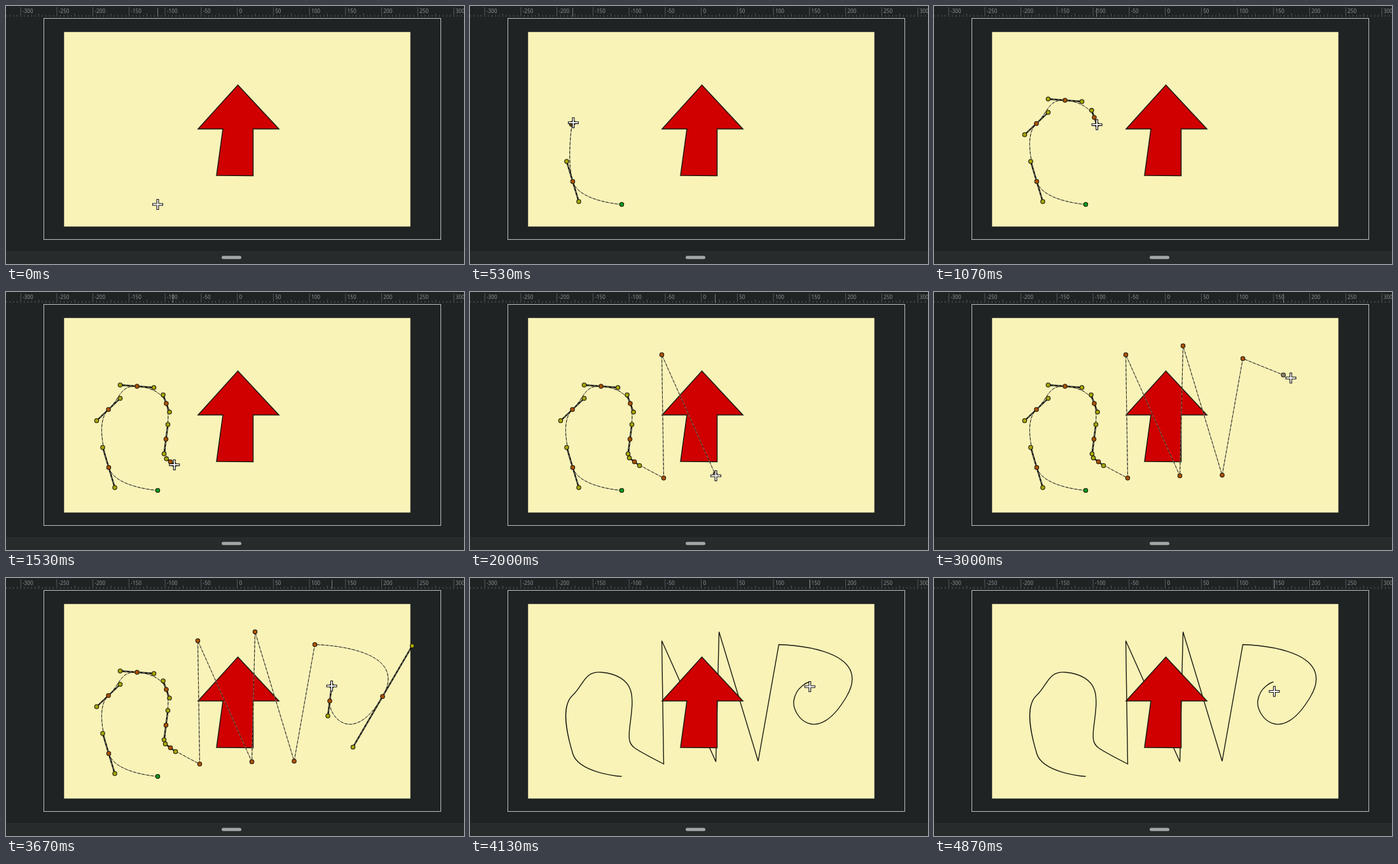
Write an HTML page that moves like this. It is 720 px wide and 405 px high and loops after 4.99 s.

```html
<!DOCTYPE html>
<html lang="en">
<head>
<meta charset="utf-8">
<title>Drawing a spline</title>
<style>
  html, body { margin: 0; width: 100%; height: 100%; overflow: hidden; background: #1f2324; }
  svg { display: block; width: 720px; height: 405px; }
  text { font: 8.2px "Noto Sans", sans-serif; fill: #8d9192; }
  path { fill: none; }
</style>
</head>
<body>
<svg viewBox="0 0 720 405">
  <rect width="720" height="405" fill="#1f2324"/>
  <g id="ruler"></g>
  <rect x="59.5" y="19.5" width="624" height="347" fill="none" stroke="#bcc0c0"/>
  <rect x="91.3" y="40.8" width="544.4" height="305.4" fill="#faf3b8"/>
  <path id="outline" stroke="#1b1a12" stroke-width="1.4"/>
  <path d="M364.5 124L429 193H388.5V266.5L331 266L341 193H302Z" style="fill:#d00000" stroke="#1b1a12" stroke-width="1.5"/>
  <g id="guides"></g>
  <path id="tick" stroke="#777c7d"/>
  <g id="cursor" stroke-linecap="square">
    <path d="M-6.5 0H6.5M0 -6.5V6.5" stroke="#111" stroke-width="4"/>
    <path d="M-6.5 0H6.5M0 -6.5V6.5" stroke="#fff" stroke-width="1.8"/>
  </g>
  <rect y="383" width="720" height="22" fill="#272b2c"/>
  <rect y="383" width="720" height="1" fill="#1a1d1e"/>
  <rect x="339" y="392.3" width="31" height="5" rx="2.5" fill="#a3a6a6"/>
</svg>
<script>
const LOOP = 4990, STEP = 200 / 3, FINISH = 62, LAG = 0.25;
const $ = id => document.getElementById(id);
const ease = u => u * u * (3 - 2 * u);
const clamp = u => Math.min(1, Math.max(0, u));

// Value at k on a line of [k, ...values] keys.
function between(keys, k, curve = u => u) {
  const i = keys.findIndex(p => p[0] > k);
  if (i < 0) return keys[keys.length - 1].slice(1);
  const a = keys[Math.max(i - 1, 0)], b = keys[i];
  const u = curve(clamp((k - a[0]) / (b[0] - a[0])));
  return a.slice(1).map((v, j) => v + (b[j + 1] - v) * u);
}

// The drawn word: "x,y" is a corner, "x,y>hx,hy" a smooth node with its outgoing handle.
const word = `238.5,311.5 161.5,275.5>152,244 161,184.5>179.5,167 206,148>232.5,150
  252,175>257,188.5 251.5,231>248.5,254 258.5,266.5>266.5,272.5 304.5,292 301.5,98.5
  386.5,288.5 391.5,84.5 453,287.5 485.5,104.5 592,186>545.5,265.5 509,193>512,169.5 533.5,163`;

// Drawing pace: node index to step of its click.
const pace = [[0, 0.5], [6, 22], [9, 30.5], [12, 42], [13, 47], [15, 58]];

const nodes = word.split(/\s+/).map((item, i) => {
  const [[x, y], [hx, hy] = [x, y]] = item.split(">").map(p => p.split(",").map(Number));
  const [press] = between(pace, i), length = Math.hypot(hx - x, hy - y);
  return { x, y, hx, hy, press, release: press + (length && 1.1 + length / 30) };
});

// Cursor route: travel, settle on the node, pull its handle, wait.
const route = nodes.flatMap((n, i) => {
  const next = nodes[i + 1];
  const leave = next ? Math.max(n.release, next.press - 3) : n.release;
  return [[n.press - 0.6, n.x, n.y], [n.press, n.x, n.y], [n.release, n.hx, n.hy], [leave, n.hx, n.hy]];
});
route.push([45, 561, 135], [66, 535, 178]);
route.sort((a, b) => a[0] - b[0]);
const cursorAt = k => between(route, k, ease);

// Nodes clicked by step k, with handles mirrored about each node.
function placed(k) {
  return nodes.filter(n => n.press <= k).map(n => {
    const u = ease(clamp((k - n.press) / (n.release - n.press || 1)));
    return { ...n, dx: (n.hx - n.x) * u, dy: (n.hy - n.y) * u };
  });
}

function curve(list) {
  return list.map((n, i) => {
    if (!i) return `M${n.x} ${n.y}`;
    const p = list[i - 1];
    return `C${p.x + p.dx} ${p.y + p.dy} ${n.x - n.dx} ${n.y - n.dy} ${n.x} ${n.y}`;
  }).join("");
}

const dot = (x, y, fill) =>
  `<circle cx="${x}" cy="${y}" r="3.2" fill="${fill}" stroke="#1c1a0c" stroke-width="1.1"/>`;

const dashed = (d, under, width, over, overWidth) =>
  `<path d="${d}" stroke="${under}" stroke-width="${width}"/>` +
  `<path d="${d}" stroke="${over}" stroke-width="${overWidth}" stroke-dasharray="4 3"/>`;

function guides(k) {
  const list = placed(k), last = list[list.length - 1];
  if (!last) return "";
  const shown = [...list];
  if (k > last.release && list.length < nodes.length) {
    const [x, y] = cursorAt(k - LAG);
    shown.push({ x, y, dx: 0, dy: 0, preview: true });
  }
  const smooth = list.filter(n => n.dx || n.dy);
  const bars = smooth.map(({ x, y, dx, dy }) =>
    dashed(`M${x - dx} ${y - dy}L${x + dx} ${y + dy}`, "#0e0e0a", 2.4, "#85867c", 1));
  const ends = smooth.map(({ x, y, dx, dy }) =>
    dot(x - dx, y - dy, "#a8a600") + dot(x + dx, y + dy, "#a8a600"));
  const dots = shown.map((n, i) =>
    dot(n.x, n.y, n.preview ? "#8b8672" : i ? "#ae5200" : "#0b9a1c"));
  return dashed(curve(shown), "#858170", 1, "#25231a", 1) + [...bars, ...ends, ...dots].join("");
}

function buildRuler() {
  const unit = 56.74 / 50;
  let labels = "", ticks = "";
  for (let v = -320; v <= 315; v += 5) {
    const x = 363.6 + v * unit, major = v % 50 === 0;
    ticks += `M${x} ${major ? 2 : v % 25 ? 14 : 12}V17`;
    if (major) labels += `<text x="${x + 2.8}" y="11.3">${v}</text>`;
  }
  $("ruler").innerHTML = `<path d="${ticks}" stroke="#5b6061" stroke-width=".9"/>${labels}`;
}

function draw(k) {
  const done = k >= FINISH;
  const [x, y] = cursorAt(k), [tickX] = cursorAt(k - LAG);
  $("guides").innerHTML = done ? "" : guides(k);
  $("outline").setAttribute("d", done ? curve(placed(k)) : "");
  $("tick").setAttribute("d", `M${Math.floor(tickX) + 0.5} 3V17`);
  $("cursor").setAttribute("transform", `translate(${x} ${y})`);
}

let shownStep = -1;
const start = performance.now();
function play() {
  const t = (performance.now() - start) % LOOP;
  const k = Math.min(73, Math.floor((t + 4) / STEP));
  if (k !== shownStep) draw(shownStep = k);
  requestAnimationFrame(play);
}

buildRuler();
play();
</script>
</body>
</html>
```
